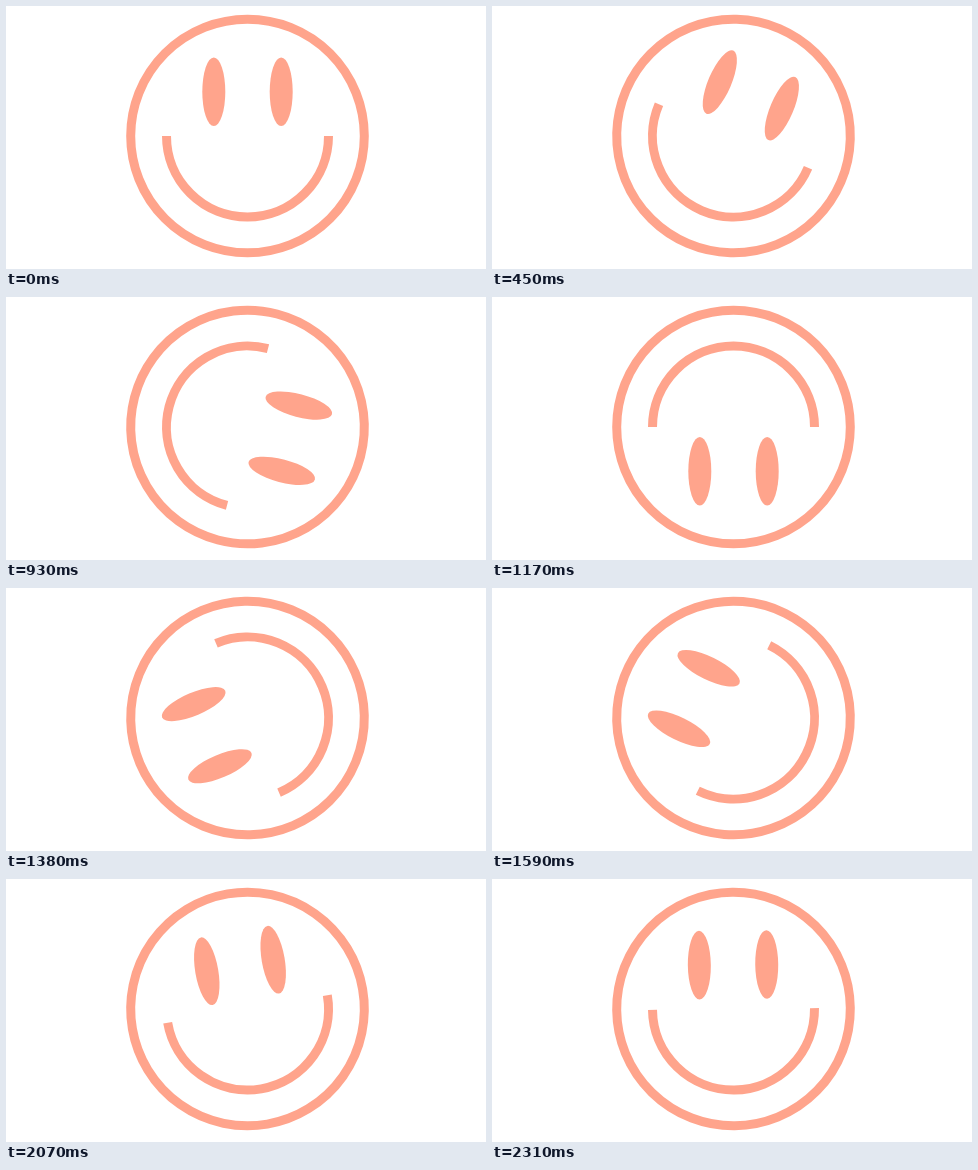
Write an HTML page that moves like this. It is 480 px wide and 263 px high and loops after 2340 ms.

```html
<!DOCTYPE html>
<html lang="en">
<head>
<meta charset="utf-8">
<title>Rolling smiley</title>
<style>
  html, body { margin: 0; width: 100%; height: 100%; overflow: hidden; background: #fff; }
  svg { display: block; width: 100%; height: 100%; }
</style>
</head>
<body>
<svg viewBox="0 0 480 263">
  <g id="face" fill="#ffa48c">
    <g fill="none" stroke="#ffa48c" stroke-width="9">
      <circle cx="241.5" cy="130" r="116.8"/>
      <path d="M160.5 130a81 81 0 0 0 162 0"/>
    </g>
    <ellipse cx="207.8" cy="85.8" rx="11.5" ry="34.3"/>
    <ellipse cx="275.2" cy="85.8" rx="11.5" ry="34.3"/>
  </g>
</svg>
<script>
  const LOOP = 2340, STEP = 30;
  const face = document.getElementById('face');

  const bezier = (a, b, s) =>
    3 * a * s * (1 - s) ** 2 + 3 * b * s * s * (1 - s) + s ** 3;

  // Symmetric ease-in-out, solved by bisection
  function ease(x) {
    let lo = 0, hi = 1;
    for (let i = 0; i < 30; i++) {
      const mid = (lo + hi) / 2;
      if (bezier(0.58, 0.42, mid) < x) lo = mid; else hi = mid;
    }
    return bezier(0.07, 0.93, lo);
  }

  function draw(ms) {
    const t = Math.floor((ms % LOOP) / STEP) * STEP;
    const angle = 360 * ease(t / LOOP);
    face.setAttribute('transform', `rotate(${angle.toFixed(3)} 241.5 130)`);
  }

  let start;
  function tick(now) {
    start ??= now;
    draw(Math.max(0, now - start));
    requestAnimationFrame(tick);
  }
  draw(0);
  requestAnimationFrame(tick);
</script>
</body>
</html>
```
